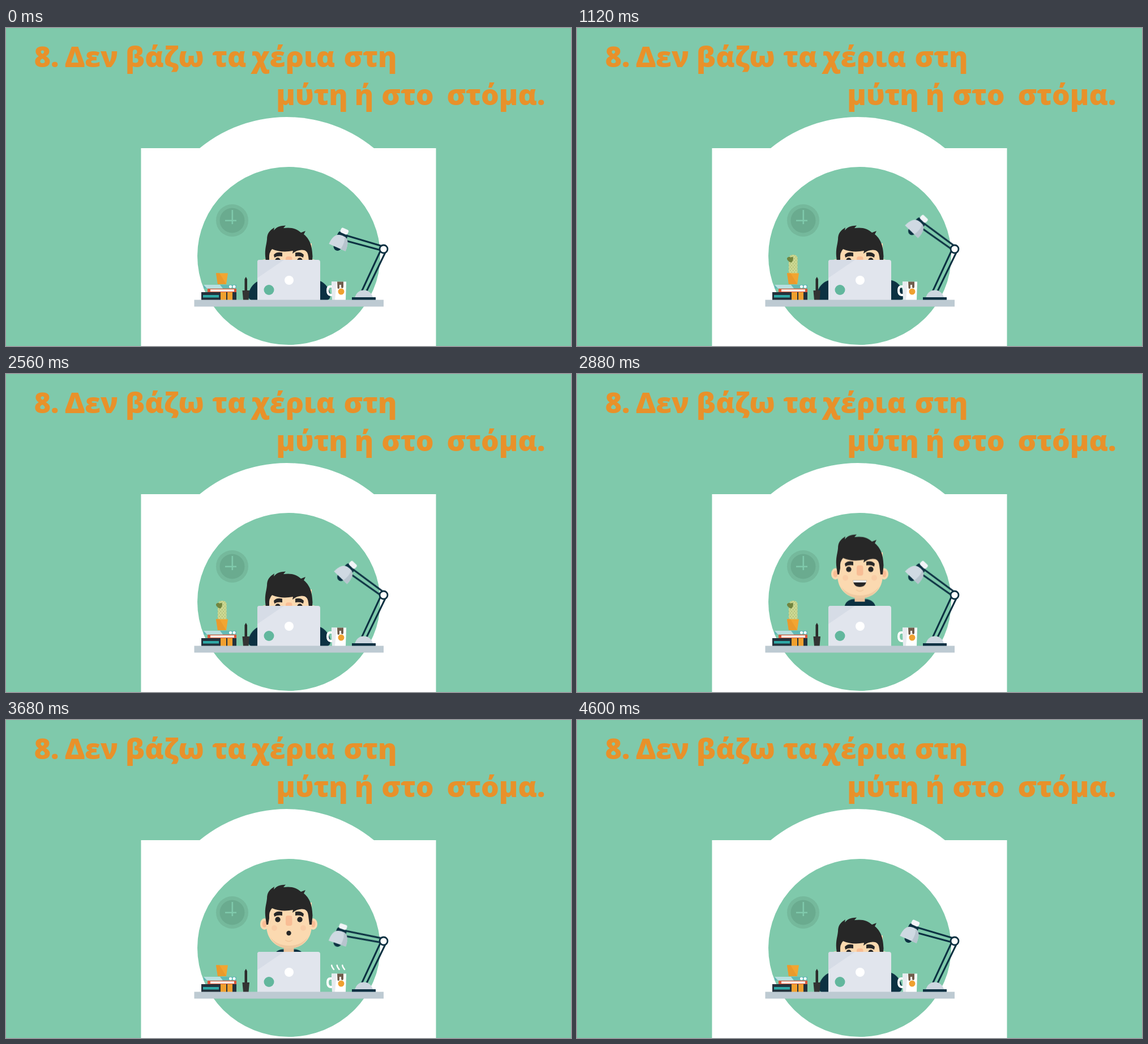
An HTML page for the animation above (4640 ms loop, 998 by 561 pixels).

```html
<!DOCTYPE html>
<html lang="el">
<head>
<meta charset="utf-8">
<title>Κανόνας 8</title>
<style>
  html, body { margin: 0; width: 100%; height: 100%; overflow: hidden; background: #7fc9ab; }
  svg { display: block; width: 100vw; height: 100vh; }
  .title { font: 800 50px "Open Sans", "Noto Sans", sans-serif; fill: #e8912a; text-anchor: middle; }
  .navy { stroke: #0c3142; stroke-width: 3; fill: none; }

  .head, .lamp, .cactus, .pot, .reach, .steam, .smile, .gasp {
    animation: 4.64s infinite ease-in-out;
  }
  .head { animation-name: head; }
  .lamp { animation-name: lamp; transform-origin: 667px 390px; }
  .cactus { animation-name: cactus; transform-origin: 381.5px 434px; }
  .pot { animation-name: pot; transform-origin: 381.5px 452px; }
  .reach { animation-name: reach; }
  .typing { animation: typing calc(4.64s / 36) infinite alternate ease-in-out; }
  .steam {
    animation-name: steam; animation-timing-function: linear;
    fill: none; stroke: #fff; stroke-width: 2.5; stroke-linecap: round;
    stroke-dasharray: 100 200;
  }
  .smile { animation-name: smile; animation-timing-function: step-end; }
  .gasp { animation-name: gasp; animation-timing-function: step-end; }

  @keyframes head {
    0%, 56% { transform: translateY(58px); }
    61.2% { transform: translateY(-9px); }
    64.7% { transform: translateY(3px); }
    67.5%, 84.7% { transform: translateY(0); }
    88.4% { transform: translateY(-9px); }
    94.5% { transform: translateY(62px); }
    97.2% { transform: translateY(57px); }
    99%, 100% { transform: translateY(58px); }
  }
  @keyframes lamp {
    0%, 1% { transform: rotate(0deg); }
    3.5% { transform: rotate(-4deg); }
    8.5% { transform: rotate(25deg); }
    11.5% { transform: rotate(18deg); }
    14%, 66% { transform: rotate(20deg); }
    70.7% { transform: rotate(30deg); }
    72.4% { transform: rotate(31deg); }
    77.5% { transform: rotate(-8deg); }
    79.3% { transform: rotate(-5deg); }
    82.5% { transform: rotate(3deg); }
    86% { transform: rotate(-1deg); }
    89%, 100% { transform: rotate(0deg); }
  }
  @keyframes cactus {
    0%, 3.5% { transform: scale(0); }
    9% { transform: scale(1.04, 1.1); }
    12% { transform: scale(.98, .96); }
    14%, 65% { transform: scale(1); }
    67.8% { transform: scale(1.06); }
    70.7% { transform: scale(.7, .42); }
    73%, 100% { transform: scale(0); }
  }
  @keyframes pot {
    0%, 2% { transform: scaleX(1); }
    5% { transform: scaleX(1.2); }
    9% { transform: scaleX(.9); }
    13%, 65% { transform: scaleX(1); }
    67.8% { transform: scaleX(1.25); }
    70.7% { transform: scaleX(.75); }
    74% { transform: scaleX(1.3); }
    77% { transform: scaleX(.95); }
    79.3%, 100% { transform: scaleX(1); }
  }
  @keyframes reach {
    0%, 55.5%, 95%, 100% { transform: translateX(0); }
    60%, 90% { transform: translateX(26px); }
  }
  @keyframes typing { to { transform: translateX(-6px); } }
  @keyframes steam {
    0%, 26.5% { stroke-dashoffset: 105; }
    34.5% { stroke-dashoffset: 0; }
    37.5% { stroke-dashoffset: -12; }
    49.2% { stroke-dashoffset: -105; }
    49.21%, 77% { stroke-dashoffset: 105; }
    85% { stroke-dashoffset: 0; }
    88% { stroke-dashoffset: -12; }
    99.5%, 100% { stroke-dashoffset: -105; }
  }
  @keyframes smile { 0% { opacity: 1; } 75%, 100% { opacity: 0; } }
  @keyframes gasp { 0% { opacity: 0; } 75%, 100% { opacity: 1; } }
</style>
</head>
<body>
<svg viewBox="0 0 998 561" preserveAspectRatio="none">
  <defs>
    <path id="arm" d="M470 445H452C438 446 428 462 428 473Q429 481 440 482H470Z" fill="#0c3142"/>
    <path id="wisp" pathLength="100"
      d="M579 440C575 435 574 432 577 428C580 424 580 422 577 418C575 415 576 413 579 412"/>
    <pattern id="spines" width="5" height="6" patternUnits="userSpaceOnUse">
      <path d="M1 1h1.4v1.4H1zM3.5 4h1.4v1.4H3.5z" fill="#a3b268"/>
    </pattern>
  </defs>

  <rect width="998" height="561" fill="#7fc9ab"/>
  <text class="title" y="69">
    <tspan x="78">8.</tspan> <tspan x="157.5">Δεν</tspan> <tspan x="287">βάζω</tspan>
    <tspan x="401">τα</tspan> <tspan x="514">χέρια</tspan> <tspan x="643.5">στη</tspan>
  </text>
  <text class="title" y="136">
    <tspan x="547">μύτη</tspan> <tspan x="639">ή</tspan>
    <tspan x="716">στο</tspan> <tspan x="865.5">στόμα.</tspan>
  </text>

  <g fill="#fff">
    <circle cx="496" cy="400" r="243" clip-path="inset(0 0 50% 0)"/>
    <rect x="238.5" y="212" width="521" height="349"/>
  </g>
  <ellipse cx="499.5" cy="402" rx="161.5" ry="157" fill="#7fc9ab"/>

  <!-- clock -->
  <circle cx="399.5" cy="339.5" r="28.5" fill="#75b99c"/>
  <circle cx="399.5" cy="339.5" r="22" fill="#6aab8f"/>
  <path d="M399.8 321V346M387 339.8H407" stroke="#7fc9ab" stroke-width="2.6"/>

  <!-- person -->
  <g class="reach"><g class="typing"><use href="#arm"/></g></g>
  <g transform="translate(1001 0) scale(-1 1)">
    <g class="reach"><g class="typing"><use href="#arm"/></g></g>
  </g>
  <g class="head">
    <path d="M472 420Q474 405 490 404.500H509Q525 405 528 420Z" fill="#0c3142"/>
    <path d="M490.500 395H508.500V409H490.500Z" fill="#e9c39d"/>
    <g fill="#fbd9b0">
      <ellipse cx="456.500" cy="360" rx="7.500" ry="10"/>
      <ellipse cx="542.500" cy="360" rx="7.500" ry="10"/>
    </g>
    <g fill="#f8bd95">
      <ellipse cx="456.500" cy="360" rx="4" ry="6"/>
      <ellipse cx="542.500" cy="360" rx="4" ry="6"/>
    </g>
    <path d="M460 322H540V362C540 388 522 403 500 403S460 388 460 362Z" fill="#fbd9b0"/>
    <path d="M466 382Q478 398 500 398T534 382Q523 403 500 403T466 382Z" fill="#efc9a0"/>
    <path d="M458 345C457 331 460 325 461 315C461 304 466 299 474 294L473 299
      C479 292 485 291 494 290.500L490 295C504 293 514 296 521 303L529 300L526 306
      C535 313 541 324 541.500 345L540 361H536L534 345Q533 336 527 334Q516 332 506 340
      L507 335Q486 339 470 332Q464 338 465 350L463 361H460Z" fill="#272727"/>
    <g fill="#272727">
      <path d="M473 342Q478 336 488 338.500V345Q480 343.500 474 347Z"/>
      <path d="M526 342Q521 336 511 338.500V345Q519 343.500 525 347Z"/>
      <circle cx="480" cy="352" r="4.700"/>
      <circle cx="519" cy="352" r="4.700"/>
    </g>
    <rect x="494" y="345" width="11.500" height="18" rx="4" fill="#f8bd95"/>
    <g fill="#f9cda6">
      <circle cx="474" cy="367" r="5"/>
      <circle cx="525" cy="367" r="5"/>
    </g>
    <g class="smile">
      <path d="M487.500 371.500H511.500Q510 383 499.500 383T487.500 371.500Z" fill="#272727"/>
      <path d="M487.500 371.500H511.500L510.500 375H488.500Z" fill="#fff"/>
    </g>
    <circle class="gasp" cx="499.500" cy="376" r="4.200" fill="#272727"/>
    <path d="M493 388Q499.500 393 506 388" fill="none" stroke="#f3c79c" stroke-width="1.500"/>
  </g>

  <!-- laptop -->
  <path d="M444 480V413Q444 409 448 409H551Q555 409 555 413V480Z" fill="#e1e5ed"/>
  <path d="M444 441V413Q444 409 448 409H491Z" fill="#d6dce6"/>
  <circle cx="500" cy="445" r="8" fill="#fff"/>
  <circle cx="464.500" cy="462" r="9" fill="#62b79d"/>

  <!-- books -->
  <rect x="345" y="466" width="62" height="14" fill="#24323c"/>
  <rect x="348" y="471" width="28" height="4.500" fill="#2fa9a6"/>
  <path d="M379 466h10v14h-10zM391 466h9v14h-9z" fill="#f0a02f"/>
  <rect x="356" y="459.500" width="51" height="6.500" fill="#d9583b"/>
  <rect x="361" y="461" width="42" height="4" fill="#f5ece3"/>
  <rect x="349" y="453" width="58" height="6.500" fill="#63b9b5"/>
  <path d="M349 453H378L383 459.500H355Z" fill="#b9dfe0"/>
  <circle cx="396.500" cy="456.300" r="2.500" fill="#fff"/>
  <circle cx="403" cy="456.300" r="2.500" fill="#fff"/>

  <!-- plant -->
  <g class="cactus">
    <path d="M374 434V408Q374 400 382 400T389.500 408V434Z" fill="#ccd892"/>
    <path d="M374 434V408Q374 400 382 400T389.500 408V434Z" fill="url(#spines)"/>
    <path d="M378 414Q370 410 371 406Q374 402 377.500 405Q381 402 382 406Q382 411 378 414Z" fill="#71853f"/>
  </g>
  <g class="pot">
    <path d="M371 432.500H392L389 452H374Z" fill="#f2a531"/>
    <path d="M371 432.500H377L389 452H374Z" fill="#ea9a2c"/>
  </g>

  <!-- pen cup -->
  <path d="M421.500 464V443L423.800 439L426 443V464Z" fill="#2b2b2b"/>
  <path d="M417.500 463H430L428.500 480H419Z" fill="#333"/>

  <!-- mug -->
  <g class="steam">
    <use href="#wisp"/>
    <use href="#wisp" x="9.500"/>
    <use href="#wisp" x="19"/>
  </g>
  <path d="M576 456H573Q568 456 568 463T573 471H577" fill="none" stroke="#fff" stroke-width="4"/>
  <path d="M575 447.500H601L600 480H576Z" fill="#fff"/>
  <path d="M575 447.500H584L581 480H576Z" fill="#e7ebef"/>
  <path d="M585 447.500H596V456Q596 459 594 459T592 456V453H589V459Q587 461 585.500 459Z" fill="#705d4c"/>
  <circle cx="592" cy="465" r="5.500" fill="#f0a02f"/>

  <!-- lamp -->
  <path class="navy" d="M661 394L628.500 464M670 396L637 464"/>
  <path d="M616 476Q620 462.500 632 462.500T648.500 476Z" fill="#cdd7e0"/>
  <rect x="611" y="475" width="42" height="5" fill="#0c3142"/>
  <g class="lamp">
    <path class="navy" d="M601 366L665 385M601 375.500L662 392"/>
    <g transform="translate(598 358) rotate(24)">
      <circle cy="30.500" r="7" fill="#0c3142"/>
      <rect x="-9" y="3" width="18" height="14" rx="5" fill="#0c3142"/>
      <rect x="-7" y="-4" width="14" height="9" rx="3" fill="#f1f4f7"/>
      <path d="M-16 32Q-16 9 0 9T16 32Z" fill="#cfd9e2"/>
      <path d="M4 9Q16 11 16 32H7Q9 16 4 9Z" fill="#b7c4ce"/>
    </g>
  </g>
  <circle cx="667" cy="390" r="7" fill="#fff" stroke="#0c3142" stroke-width="2.800"/>

  <rect x="332.500" y="479.500" width="334.500" height="12" fill="#bdcad2"/>
</svg>
</body>
</html>
```
